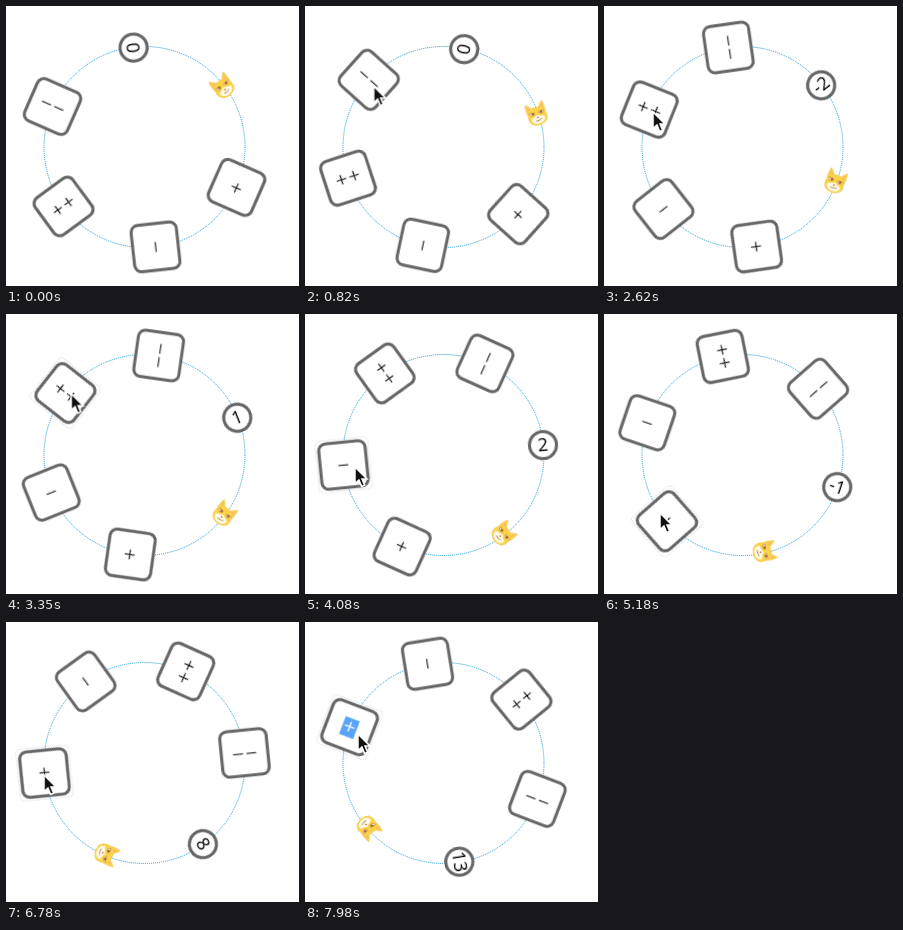
An HTML page for the animation above (8 s loop, 293 by 280 pixels).

```html
<!DOCTYPE html>
<html lang="en">
<head>
<meta charset="utf-8">
<title>Orbiting counter</title>
<style>
  html, body { margin: 0; width: 100%; height: 100%; overflow: hidden; background: #fff; }
  svg { display: block; width: 293px; height: 280px; }
  text { text-anchor: middle; fill: #000; stroke: #fff; stroke-width: .3; font: 16px "DejaVu Sans", sans-serif; }
  #count { stroke: none; font: 18px "Open Sans", "Noto Sans", sans-serif; }
  .orbit { fill: none; stroke: #1b9bd7; stroke-dasharray: 1 1; }
  .frame { fill: #fff; stroke: #666; stroke-width: 3.1; }
  .focus { fill: none; stroke: #8296b4; stroke-opacity: .35; stroke-dasharray: 1 1; visibility: hidden; }
  .marker { fill: #5aa5fb; visibility: hidden; }
  .focused .focus, .selected .marker { visibility: visible; }
  .selected text { fill: #fff; stroke: none; }
  #wheel { transform-origin: 0 0; animation: spin 8s linear infinite; }
  #pointer { animation: roam 8s linear infinite; }
  @keyframes spin {
    from { transform: rotate(-96.3deg); }
    to { transform: rotate(81.3deg); }
  }
  @keyframes roam {
    0%, 7.4% { transform: translate(62px, 87px); opacity: 0; }
    7.5% { transform: translate(62px, 87px); opacity: 1; }
    20% { transform: translate(92px, 56px); }
    25% { transform: translate(98px, 51px); }
    30% { transform: translate(48px, 112px); }
    32.75% { transform: translate(49px, 106px); }
    43.5% { transform: translate(68px, 75px); }
    47% { transform: translate(48px, 161px); }
    51% { transform: translate(50px, 153px); }
    57% { transform: translate(44px, 137px); }
    61.5% { transform: translate(64px, 207px); }
    64.75% { transform: translate(56px, 199px); }
    75% { transform: translate(45px, 179px); }
    84.75% { transform: translate(38px, 153px); }
    99.75%, 100% { transform: translate(53px, 112px); opacity: 1; }
  }
</style>
</head>
<body>
<svg viewBox="0 0 293 280">
  <g transform="translate(138.5 141)">
    <circle class="orbit" r="100.5"/>
    <g id="wheel">
      <g transform="translate(100 0)">
        <circle class="frame" r="13.5"/>
        <text id="count" y="6.4">0</text>
      </g>
      <g transform="rotate(60) translate(99 -2.5)">
        <path d="M-8.8 -11.5Q-6 -10 -4 -6.5H4Q6 -10 8.8 -11.5Q10 -5 9 0Q10.5 5 7.5 8.5Q4 11.3 0 11.3Q-4 11.3 -7.5 8.5Q-10.5 5 -9 0Q-10 -5 -8.8 -11.5Z" fill="#fcd24b" stroke="#efb834" stroke-width=".5"/>
        <path d="M-8 -9.5L-5 -6L-7.5 -4ZM8 -9.5L5 -6L7.5 -4Z" fill="#f6bd62"/>
        <path d="M0 1Q3 2.5 7 4Q7 9.5 0 10Q-7 9.5 -7 4Q-3 2.5 0 1Z" fill="#fffbe8"/>
        <path d="M-7.5 -2.2L-2 -1.6Q-3 .9 -4.8 .8Q-6.8 .6 -7.5 -2.2ZM7.5 -2.2L2 -1.6Q3 .9 4.8 .8Q6.8 .6 7.5 -2.2Z" fill="#fff" stroke="#a86a22" stroke-width=".5"/>
        <path d="M-5.5 -2H-2.8V.3H-4.6ZM3.4 -2H6.1L5.6 .3H4Z" fill="#9a5a20"/>
        <path d="M-1.4 3.2H1.4L0 4.8Z" fill="#d0654c"/>
        <path d="M-2.8 6.5Q0 8 3.5 5.5" fill="none" stroke="#a9793c" stroke-width=".8"/>
      </g>
    </g>
  </g>
  <path id="pointer" d="M0 0V16.5L3.9 13L6.6 19.4L9.6 18.1L7 11.9H12Z" fill="#111" stroke="#fff" stroke-width="1.5"/>
</svg>
<script>
const LOOP = 8000;
const wheel = document.getElementById('wheel');
const count = document.getElementById('count');

// Each button has a focus span and the times at which it is pressed.
const every = (start, step, n) => Array.from({ length: n }, (_, i) => start + i * step);
const buttons = [
  { label: '+', angle: 120, delta: 1, focus: [5100, LOOP], presses: [5100, ...every(5320, 170, 9), ...every(6960, 240, 5)] },
  { label: '−', angle: 180, delta: -1, focus: [3900, 5100], presses: every(3900, 210, 5) },
  { label: '++', angle: 240, delta: 1, focus: [2800, 3900], presses: every(2800, 200, 5) },
  { label: '−−', angle: 300, delta: -1, focus: [1200, 2500], presses: [1200, 1900] }
];

for (const button of buttons) {
  wheel.insertAdjacentHTML('beforeend', `
    <g transform="rotate(${button.angle}) translate(100.5 0)">
      <rect class="focus" x="-26.5" y="-26" width="53" height="52" rx="4"/>
      <rect class="frame" x="-23.3" y="-22.8" width="46.6" height="45.6" rx="7"/>
      <rect class="marker" x="-7.5" y="-10" width="15" height="19"/>
      <text y="5.5">${button.label}</text>
    </g>`);
  button.node = wheel.lastElementChild;
}

const clock = wheel.getAnimations()[0];

function draw() {
  const t = (clock.currentTime || 0) % LOOP;
  let total = 0;
  for (const { node, delta, focus, presses, label } of buttons) {
    total += delta * presses.filter(p => p <= t).length;
    node.classList.toggle('focused', t >= focus[0] && t < focus[1]);
    node.classList.toggle('selected', label === '+' && t >= 7920);
  }
  if (count.textContent !== String(total)) count.textContent = total;
  requestAnimationFrame(draw);
}
draw();
</script>
</body>
</html>
```
